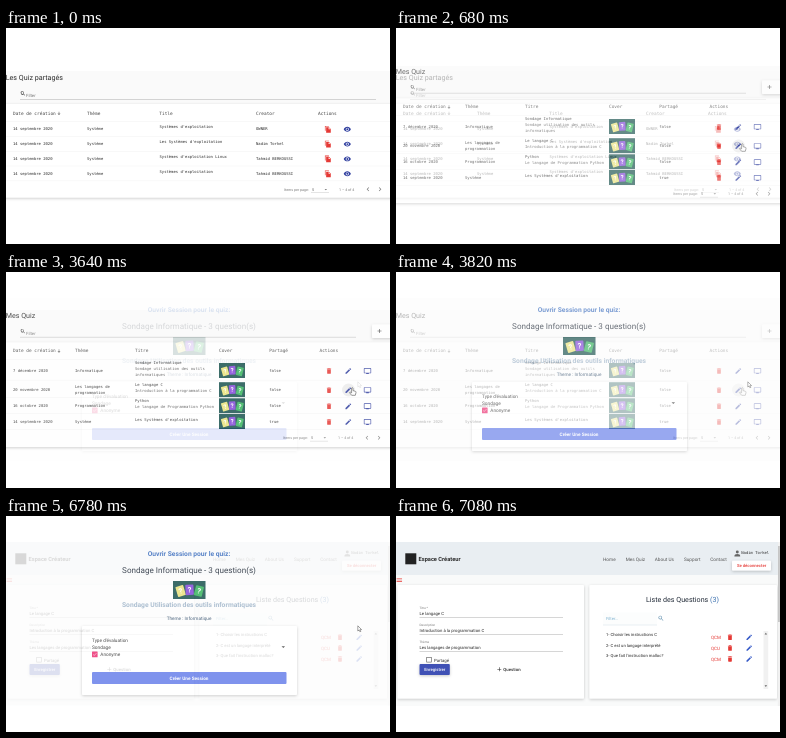
An HTML page that plays this animation: 384x216 px, repeating every 8 s.

```html
<!DOCTYPE html>
<html lang="fr">
<head>
<meta charset="utf-8">
<title>Quiz</title>
<style>
html, body { margin: 0; width: 100%; height: 100%; overflow: hidden; background: #fff; }
svg { position: absolute; left: 0; top: 0; width: 100%; height: 100%; }
text { font-family: Roboto, Arial, sans-serif; text-rendering: geometricPrecision; white-space: pre; }
.mono { font-family: "DejaVu Sans Mono", "Noto Sans Mono", monospace; }
</style>
</head>
<body>
<script>
const LOOP = 8000, STEP = 60, STEPS = 6;
const RED = '#e53935', BLUE = '#303f9f', INK = '#2b2b2b', GREY = '#777';

const ICONS = {
  edit: 'M3 17.2V21h3.8L17.8 9.9l-3.7-3.7zM20.7 7c.4-.4.4-1 0-1.4l-2.3-2.3c-.4-.4-1-.4-1.4 0l-1.9 1.8 3.8 3.8z',
  trash: 'M6 7h12v12q0 2-2 2H8q-2 0-2-2zM19 4h-3.5l-1-1h-5l-1 1H5v2h14z',
  eye: 'M12 4.5C7 4.5 2.7 7.6 1 12c1.7 4.4 6 7.5 11 7.5s9.3-3.1 11-7.5C21.3 7.6 17 4.5 12 4.5zM12 17a5 5 0 1 1 0-10a5 5 0 0 1 0 10zM12 9a3 3 0 1 0 0 6a3 3 0 0 0 0-6z',
  screen: 'M3 3h18q2 0 2 2v12q0 2-2 2h-5v2H8v-2H3q-2 0-2-2V5q0-2 2-2zM3 5v12h18V5z',
  search: 'M9.5 3a6.5 6.5 0 1 0 4 11.6l5.500 5.900 1.500-1.500-5.900-5.500A6.500 6.500 0 0 0 9.500 3zM9.500 5a4.500 4.500 0 1 1 0 9a4.500 4.500 0 0 1 0-9z',
  next: 'M10 6 8.600 7.400 13.200 12l-4.600 4.600L10 18l6-6z',
  prev: 'M14 6l1.400 1.400L10.800 12l4.600 4.600L14 18l-6-6z',
  plus: 'M19 13h-6v6h-2v-6H5v-2h6V5h2v6h6z',
  down: 'M6 10h12l-6 6z',
  sort: 'M11 4h2v12l4-4 1.400 1.400L12 20l-6.400-6.600L7 12l4 4z',
  copy: 'M2 1h13v2H4v14H2zM6 5h9l6 6v12H6zM14 6.500V12h5.500z',
  user: 'M12 2a5 5 0 1 1 0 10a5 5 0 0 1 0-10zM2 22q0-8 10-8t10 8z',
  menu: 'M3 6h18v2.200H3zM3 11h18v2.200H3zM3 16h18v2.200H3z',
  check: 'M9 16.200 4.800 12l-1.400 1.400L9 19 21 7l-1.400-1.400z'
};

const icon = (name, x, y, size, fill) =>
  `<path d="${ICONS[name]}" fill="${fill}" fill-rule="evenodd" transform="translate(${x - size / 2} ${y - size / 2}) scale(${size / 24})"/>`;
const text = (x, y, s, size, fill = INK, attrs = '') =>
  `<text x="${x}" y="${y}" font-size="${size}" fill="${fill}" ${attrs}>${s}</text>`;
const mono = (x, y, s, size = 3.86, fill = INK) => text(x, y, s, size, fill, 'class="mono"');
const head = (x, y, s) => mono(x, y, s, 4.45, '#444');
const mid = (y, s, size, fill, weight = 400, x = 183) =>
  text(x, y, s, size, fill, `text-anchor="middle" font-weight="${weight}"`);
const rect = (x, y, w, h, fill, attrs = '') =>
  `<rect x="${x}" y="${y}" width="${w}" height="${h}" fill="${fill}" ${attrs}/>`;
const rule = (x1, x2, y, color = '#999', w = .4) => rect(x1, y - w / 2, x2 - x1, w, color);
const card = (x, y, w, h) => rect(x, y, w, h, '#fff', 'rx="1" filter="url(#shadow)"');

const quizCard = (x, y, turn, fill) =>
  `<g transform="translate(${x} ${y}) rotate(${turn})">${rect(-4, -5.2, 8, 10.4, fill, 'rx=".8"')}` +
  mid(2.6, '?', 7.5, '#fff', 700, 0) + '</g>';
const cover = (x, y, w, h) =>
  `<g transform="translate(${x} ${y}) scale(${w / 32} ${h / 18})">${rect(0, 0, 32, 18, '#17504c')}` +
  quizCard(7.5, 10, -16, '#e9e27a') + quizCard(25.5, 10, 14, '#35b45c') +
  quizCard(16.3, 8.8, -3, '#8247d8') + '</g>';

const filterBar = (y, right) =>
  icon('search', 17, y - 1, 5.8, INK) + text(20, y + 2.3, 'Filter', 4.3, GREY) + rule(14, right, y + 4.8);

const pager = (x, y) =>
  text(x, y + 1.3, 'Items per page:', 3.6, GREY) + text(x + 28, y + 1.3, '5', 3.7, '#555') +
  icon('down', x + 41.800, y, 5, GREY) + rule(x + 27, x + 45, y + 3.4, '#bbb') +
  text(x + 55, y + 1.3, '1 – 4 of 4', 3.6, GREY) +
  icon('prev', x + 84, y, 8, GREY) + icon('next', x + 96, y, 8, GREY);

function sharedList() {
  const heads = [[7, 'Date de création'], [81, 'Thème'], [153.300, 'Title'], [250, 'Creator'], [312, 'Actions']];
  const sys = 'Systèmes d\'exploitation';
  const rows = [
    [101, sys, 'OWNER'],
    [115.800, 'Les ' + sys, 'Nadim Torkel'],
    [130.600, sys + ' Linux', 'Tahmid BERKOUSSI'],
    [145.500, sys, 'Tahmid BERKOUSSI']
  ];
  return rect(0, 43, 384, 40, '#fafafa') + card(-3, 76, 390, 93.500) +
    text(-.3, 52.300, 'Les Quiz partagés', 7.15) + filterBar(66.500, 370) +
    heads.map(([x, s]) => head(x, 86.500, s)).join('') + icon('sort', 53, 85.300, 5, INK) +
    rule(0, 384, 93.300, '#eee') +
    rows.map(([y, title, owner]) =>
      mono(7, y + 1.300, '14 septembre 2020') + mono(81, y + 1.300, 'Système') +
      mono(153.500, y - .700, title) + mono(250, y + 1.300, owner) +
      icon('copy', 322, y + .300, 7.400, RED) + icon('eye', 341.300, y + .300, 7.800, BLUE) +
      rule(0, 384, y + 7.400, '#eee')).join('') +
    pager(278, 161.300);
}

const hand = (x, y) =>
  `<path transform="translate(${x} ${y})" d="M-.7-3.300q.700-.900 1.400 0v2.600l2.600.800q.600.400.400 1.200l-.700 2.700h-3.600l-2.200-2.600q.300-1.100 1.300-.400l.800.500z" fill="#fff" stroke="#222" stroke-width=".55"/>`;
const arrow = (x, y) =>
  `<path transform="translate(${x} ${y})" d="M0 0v5.200l1.200-1 .9 1.800.9-.4-.9-1.800h1.700z" fill="#fff" stroke="#222" stroke-width=".5"/>`;

function myQuizzes() {
  const heads = [[7, 'Date de création'], [69, 'Thème'], [129, 'Titre'], [213, 'Cover'], [263.300, 'Partagé'], [313.500, 'Actions']];
  const rows = [
    [98.500, '7 décembre 2020', ['Informatique'], ['Sondage Informatique', 'Sondage utilisation des outils', 'informatiques'], 'false'],
    [117.700, '20 novembre 2020', ['Les langages de', 'programmation'], ['Le langage C', 'Introduction à la programmation C'], 'false'],
    [133.800, '16 octobre 2020', ['Programmation'], ['Python', 'Le langage de Programmation Python'], 'false'],
    [149.500, '14 septembre 2020', ['Système'], ['Les Systèmes d\'exploitation'], 'true']
  ];
  const block = (x, y, lines, sub = INK) =>
    lines.map((s, i) => mono(x, y + (i - (lines.length - 1) / 2) * 6.100, s, 3.86, i ? sub : INK)).join('');
  return rect(0, 38, 384, 40, '#fafafa') + card(-3, 70.500, 390, 104.500) +
    text(-.3, 46.300, 'Mes Quiz', 7.15) + filterBar(60.300, 350) +
    rect(366, 52.500, 20, 13.500, '#fff', 'rx="1" filter="url(#shadow)"') + icon('plus', 373.500, 59, 7, INK) +
    heads.map(([x, s]) => head(x, 80.300, s)).join('') + icon('sort', 53, 79, 5, INK) +
    rule(0, 384, 87.500, '#eee') +
    rows.map(([y, date, theme, title, shared], i) =>
      mono(7, y + 1.300, date) + block(69, y + 1.300, theme) +
      block(129, y - (i == 3 ? .800 : .400), title, '#555') +
      cover(213, y - 7.500, 26, 15) + mono(263.300, y + 1.300, shared) +
      (i == 1 ? `<circle cx="342.500" cy="${y + .300}" r="6.500" fill="#ececec"/>` : '') +
      icon('trash', 323, y + .500, 7.300, RED) + icon('edit', 342.300, y + .500, 7.600, BLUE) +
      icon('screen', 361.500, y + .500, 8, BLUE) +
      rule(0, 384, y + (i ? 8 : 9.600), '#eee')).join('') +
    pager(277, 165.700) + hand(346.300, 119.300);
}

function openSession() {
  return rect(0, 26, 384, 163, '#fdfdfd') +
    mid(40.300, 'Ouvrir Session pour le quiz:', 6.700, '#3d6fc0', 700) +
    mid(56.800, 'Sondage Informatique - 3 question(s)', 8.100, '#222b38') +
    cover(167, 65, 32.500, 18) +
    mid(91, 'Sondage Utilisation des outils informatiques', 6.720, '#9db3c8', 700) +
    mid(104.200, 'Theme : Informatique', 4.700, '#2d4a68') +
    card(76, 110, 215, 69) +
    text(86, 126.200, 'Type d\'évaluation', 4.700) + text(86, 132.700, 'Sondage', 4.800) +
    icon('down', 277.300, 130.800, 7, '#444') +
    rect(86, 135.600, 5.600, 5.600, '#ec2f72', 'rx=".5"') + icon('check', 88.800, 138.300, 5, '#fff') +
    text(94.300, 140.200, 'Anonyme', 4.750) +
    rect(86, 156, 194.500, 12, '#667eea', 'rx="1"') + mid(163.600, 'Créer Une Session', 4.700, '#fff', 700) +
    arrow(351.800, 109.800);
}

function editor() {
  const nav = [[207, 'Home'], [229.700, 'Mes Quiz'], [258.800, 'About Us'], [288, 'Support'], [314.300, 'Contact']];
  const fields = [
    [99.200, 'Titre *', 'Le langage C'],
    [115.900, 'Description', 'Introduction à la programmation C'],
    [132.700, 'Thème', 'Les langages de programmation']
  ];
  const questions = [
    [119.700, '1- Choisir les instructions C', 'QCM'],
    [130.500, '2- C est un langage interprété', 'QCU'],
    [141.300, '3- Que fait l\'instruction malloc?', 'QCM']
  ];
  return rect(0, 26, 384, 164, '#f9fafa') + rect(0, 26, 384, 33, '#e9eef2') +
    rect(9.300, 37.300, 11, 11, '#222') + text(22.500, 44.700, 'Espace Créateur', 5.700, INK, 'font-weight="700"') +
    nav.map(([x, s]) => text(x, 44.500, s, 4.700, '#555')).join('') +
    icon('user', 341.300, 37.500, 7, '#666') + mono(345.300, 38.300, 'Nadim Torkel') +
    rect(336, 44.800, 39, 9.600, '#fff', 'rx="1" filter="url(#shadow)"') +
    mid(51.200, 'Se déconnecter', 4.200, RED, 500, 355.500) +
    icon('menu', 3.300, 64, 7.300, RED) +
    card(1.500, 69, 186.500, 113.500) + card(193.500, 69, 187.500, 113.500) +
    fields.map(([y, label, value]) =>
      text(23.500, y - 6.100, label, 3.100, GREY) + text(23.500, y, value, 4.250) +
      rule(23.500, 167, y + 2.500)).join('') +
    rect(30.700, 141.500, 4.600, 4.600, '#fff', 'stroke="#555" stroke-width=".6"') +
    text(38, 145.500, 'Partagé', 4.300) +
    rect(23.500, 148, 30.300, 11, '#3f51b5', 'rx="1" filter="url(#shadow)"') +
    mid(155, 'Enregistrer', 4.300, '#fff', 500, 38.700) +
    icon('plus', 103.300, 153.300, 6.800, INK) + text(107.300, 154.800, 'Question', 4.300, INK, 'font-weight="500"') +
    text(250, 85.700, 'Liste des Questions <tspan fill="#3f73b0">(3)</tspan>', 7.120, '#222b38') +
    rect(207, 96.500, 54, 12.500, '#fcfdfd') + text(210, 104, 'Filter...', 4.200, '#7fb3d0') +
    rule(207, 261, 109, '#c5d5df') + icon('search', 265, 102.300, 6.700, '#5f8fae') +
    questions.map(([y, s, kind]) =>
      text(210, y, s, 4.200) + text(315, y + 3.200, kind, 4.500, RED) +
      icon('trash', 334, y + 1.600, 7.300, RED) + icon('edit', 353.200, y + 1.600, 7.300, '#3559c7')).join('') +
    rect(367.500, 115, 4.700, 58, '#f1f1f1') +
    `<path d="M368.600 118.500h2.500l-1.250-1.700zM368.600 169.300h2.500l-1.250 1.700z" fill="#666"/>` +
    rect(381.800, 26, 2.200, 164, '#f1f1f1') + rect(382.100, 30, 1.700, 76, '#c1c1c1');
}

const SHADOW = `<defs><filter id="shadow" x="-20%" y="-20%" width="140%" height="150%">
  <feDropShadow dx="0" dy="1" stdDeviation="1.500" flood-opacity=".22"/></filter></defs>`;

// Each scene covers the one before it in six hard steps of opacity.
const SCENES = [[sharedList, 0], [myQuizzes, 500], [openSession, 3640], [editor, 6780]];

const layers = SCENES.map(([draw]) => {
  document.body.insertAdjacentHTML('beforeend',
    `<svg viewBox="0 0 384 216">${SHADOW}${rect(0, 0, 384, 216, '#fff')}${draw()}</svg>`);
  return document.body.lastElementChild;
});

layers.forEach((layer, n) => {
  const start = SCENES[n][1];
  if (!start) return;
  const frames = [{ offset: 0, opacity: 0, easing: 'step-end' }];
  for (let k = 0; k < STEPS; k++)
    frames.push({ offset: (start + k * STEP) / LOOP, opacity: (k + 1) / STEPS, easing: 'step-end' });
  frames.push({ offset: 1, opacity: 1 });
  layer.animate(frames, { duration: LOOP, iterations: Infinity });
});
</script>
</body>
</html>
```
